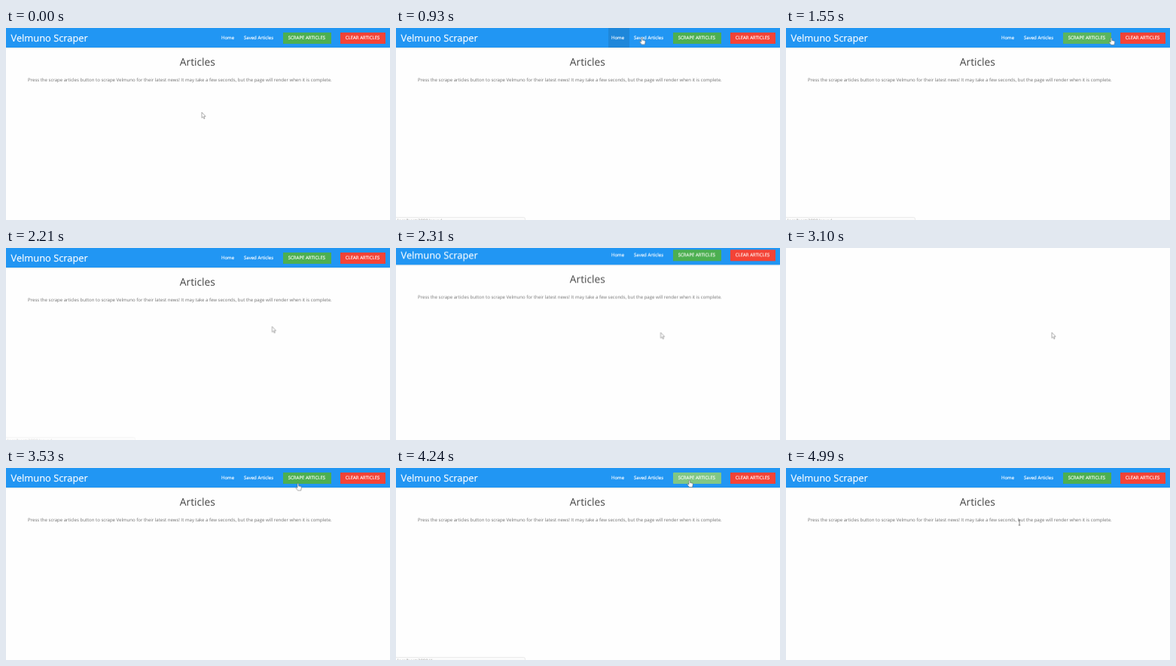
Animation, 510 px wide and 255 px high, one loop 8000 ms. Source, as an HTML page:

```html
<!DOCTYPE html>
<html lang="en">
<head>
<meta charset="utf-8">
<title>Articles</title>
<style>
  html, body { margin: 0; width: 100%; height: 100%; overflow: hidden; background: #fefefe; }
  svg { display: block; width: 100vw; height: 100vh; }
  text { font-family: "Open Sans", "Noto Sans", sans-serif; font-size: 6.05px; text-rendering: geometricPrecision; }
  .nav text, .foot text { fill: #fff; }
  .nav text { stroke: #fff; stroke-width: .15; }
  .nav .brand { font-size: 12.85px; }
  .bar { filter: drop-shadow(0 .8px .8px rgba(0, 0, 0, .22)); }
  .btn { filter: drop-shadow(0 .8px .6px rgba(0, 0, 0, .3)); }
  .title { font-size: 13.8px; fill: #444; }
  .lead { fill: #707070; }

  /* One loop is 8 s, so 1% is 80 ms. */
  .page, .cursor, .cursor > *, .hover, .status, .status text { animation: 8s linear infinite; }
  .page { animation-name: scroll; }
  .cursor { animation-name: move; }
  .cursor > *, .status, .status text { animation-timing-function: step-end; }
  .arrow { animation-name: arrow; }
  .hand { animation-name: hand; }
  .beam { animation-name: beam; }
  .hover { opacity: 0; }
  .home { animation-name: home; }
  .saved { animation-name: saved; }
  .scrape { animation-name: scrape; }
  .clear { animation-name: clear; }
  .status { animation-name: status; }
  .status .link { animation-name: link; }
  .status .action { animation-name: action; }

  @keyframes scroll {
    0%, 28.5% { transform: none; animation-timing-function: ease-in-out; }
    32.5%, 37.3% { transform: translateY(-200px); animation-timing-function: ease-in-out; }
    41.5%, 100% { transform: none; }
  }
  @keyframes move {
    0%, 4% { transform: translate(260px, 112px); animation-timing-function: ease-in; }
    10% { transform: translate(296px, 20px); }
    11.6% { transform: translate(325.5px, 12.5px); animation-timing-function: ease-out; }
    13.75%, 14.4% { transform: translate(336px, 12px); animation-timing-function: ease-in-out; }
    18% { transform: translate(398px, 13px); }
    21% { transform: translate(470px, 13px); animation-timing-function: ease-in-out; }
    24.2%, 25% { transform: translate(410px, 52px); }
    27.6% { transform: translate(353.5px, 104px); animation-timing-function: ease-out; }
    32%, 37.2% { transform: translate(349px, 123px); animation-timing-function: ease-in-out; }
    44.1% { transform: translate(387px, 20.5px); animation-timing-function: ease-out; }
    46.8%, 58.1% { transform: translate(389px, 16px); animation-timing-function: ease-in-out; }
    62.3%, 100% { transform: translate(310px, 69px); }
  }
  @keyframes arrow {
    0% { opacity: 1; }
    9.8% { opacity: 0; }
    22.4% { opacity: 1; }
    43.8% { opacity: 0; }
    58.8% { opacity: 1; }
    61.4%, 100% { opacity: 0; }
  }
  @keyframes hand {
    0% { opacity: 0; }
    9.8% { opacity: 1; }
    22.4% { opacity: 0; }
    43.8% { opacity: 1; }
    58.8%, 100% { opacity: 0; }
  }
  @keyframes beam {
    0% { opacity: 0; }
    61.4%, 100% { opacity: 1; }
  }
  @keyframes home {
    0%, 9.6% { opacity: 0; }
    10.6%, 11.7% { opacity: .1; }
    14%, 100% { opacity: 0; }
  }
  @keyframes saved {
    0%, 11.7% { opacity: 0; }
    13.6%, 15.6% { opacity: .1; }
    18%, 100% { opacity: 0; }
  }
  @keyframes scrape {
    0%, 16.6% { opacity: 0; }
    17.6%, 18.6% { opacity: .18; }
    20%, 45% { opacity: 0; }
    47%, 51% { opacity: .18; }
    52.6%, 54% { opacity: .3; }
    57%, 58.5% { opacity: .18; }
    60.5%, 100% { opacity: 0; }
  }
  @keyframes clear {
    0%, 19.8% { opacity: 0; }
    20.8%, 21.5% { opacity: .18; }
    23%, 100% { opacity: 0; }
  }
  @keyframes status {
    0% { opacity: 0; }
    10.6% { opacity: 1; }
    22.6% { opacity: .4; }
    28.4% { opacity: 0; }
    47.6% { opacity: 1; }
    59.6%, 100% { opacity: 0; }
  }
  @keyframes link {
    0% { opacity: 1; }
    28.4%, 100% { opacity: 0; }
  }
  @keyframes action {
    0% { opacity: 0; }
    28.4%, 100% { opacity: 1; }
  }
</style>
</head>
<body>
<svg viewBox="0 0 510 255">
  <g class="page">
    <text class="title" x="230.8" y="49.5">Articles</text>
    <text class="lead" x="29" y="70.8">Press the scrape articles button to scrape Velmuno for their latest news! It may take a few seconds, but the page will render when it is complete.</text>

    <g class="nav">
      <rect class="bar" width="510" height="26" fill="#2196f3"/>
      <rect class="hover home" x="282" width="28" height="26"/>
      <rect class="hover saved" x="310" width="51" height="26"/>
      <text class="brand" x="6.5" y="18.2">Velmuno Scraper</text>
      <text x="286" y="15.4">Home</text>
      <text x="316" y="15.4">Saved Articles</text>
      <rect class="btn" x="368" y="6" width="64" height="15" rx=".8" fill="#4caf50"/>
      <rect class="hover scrape" x="368" y="6" width="64" height="15" rx=".8" fill="#fff"/>
      <text x="374.7" y="15.4">SCRAPE ARTICLES</text>
      <rect class="btn" x="444" y="6" width="60" height="15" rx=".8" fill="#f44336"/>
      <rect class="hover clear" x="444" y="6" width="60" height="15" rx=".8" fill="#fff"/>
      <text x="450.7" y="15.4">CLEAR ARTICLES</text>
    </g>

    <g class="foot">
      <rect y="431" width="510" height="24" fill="#6f6f6f"/>
      <text x="75" y="452.4">© 2018 Velmuno Scraper</text>
    </g>
  </g>

  <g class="status">
    <path d="M-1 251.5H169.5Q171.5 251.5 171.5 253.5V256H-1Z" fill="#fbfbfb" stroke="#e2e2e2" stroke-width=".7"/>
    <text class="link" x="2" y="258" fill="#999">localhost:3000/saved</text>
    <text class="action" x="2" y="258" fill="#999">localhost:3000/#</text>
  </g>

  <g class="cursor" stroke-linejoin="round">
    <path class="arrow" d="M0 0V7.4L1.7 5.9L2.9 8.6L4 8.1L2.9 5.4H5.1Z" fill="#fff" stroke="#777" stroke-width=".6"/>
    <path class="hand" d="M0 .6Q.8-.4 1.6 .6V3.6L4.6 4.2Q5.5 4.4 5.4 5.6L4.7 9.4H.5L-2.2 5.9Q-1.9 4.8-.9 5.3L0 6Z" fill="#fff" stroke="#444" stroke-width=".5"/>
    <path class="beam" d="M-1.3 0H1.3M0 0V7M-1.3 7H1.3" fill="none" stroke="#555" stroke-width=".7"/>
  </g>
</svg>
</body>
</html>
```
